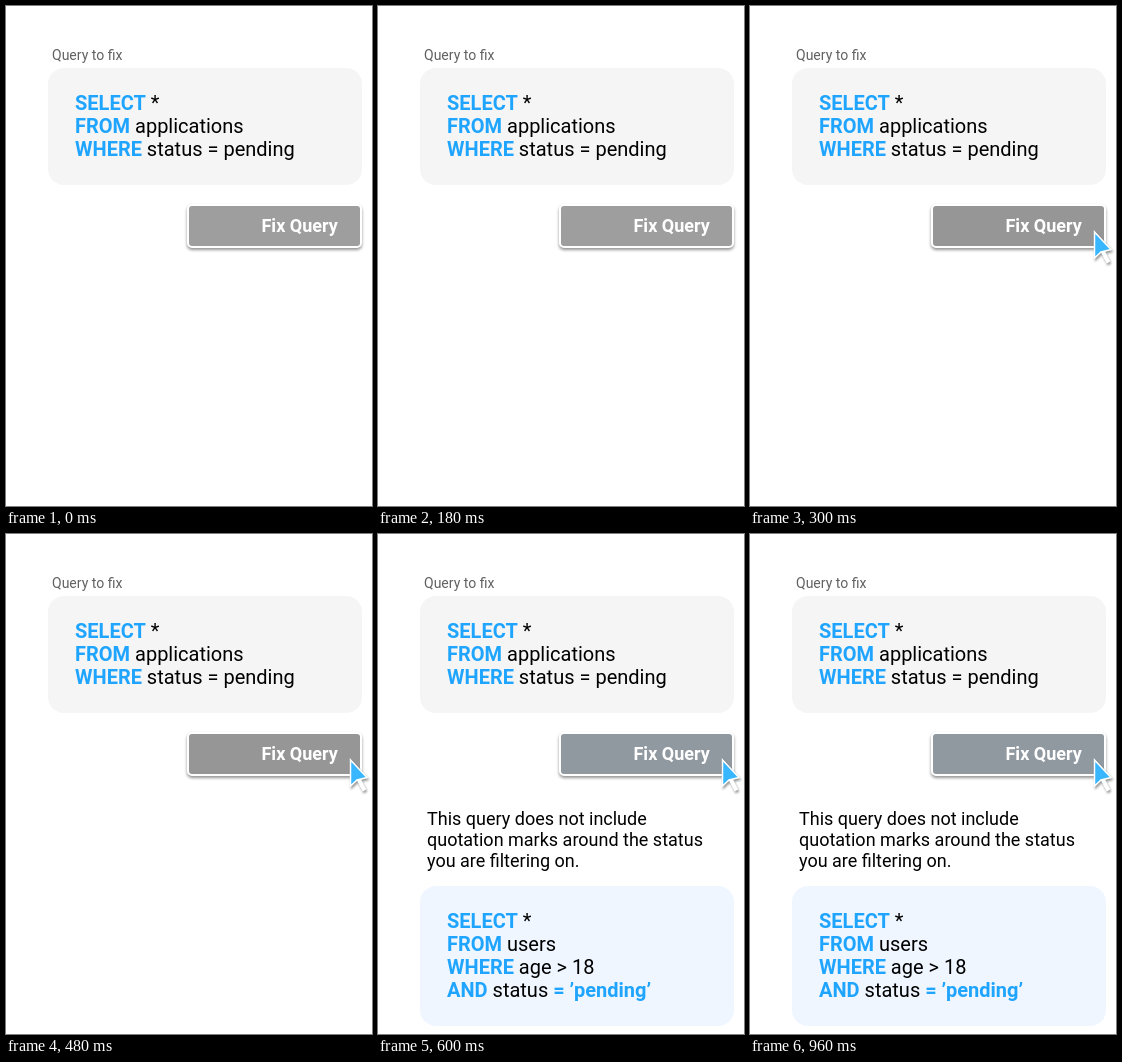
These frames come from a looping animation (366x500 px, 1.2 s). An HTML page:

```html
<!DOCTYPE html>
<html lang="en">
<head>
<meta charset="utf-8">
<title>Fix Query</title>
<style>
  html, body { margin: 0; width: 100%; height: 100%; overflow: hidden; background: #fff; }
  svg { display: block; font: 20px Roboto, sans-serif; }
  .key { font-weight: 700; fill: #1fa5ff; }
  .label { font-size: 14px; fill: #616161; }
  .note { font-size: 18px; }
  .action { font-size: 18px; font-weight: 700; fill: #fff; }
  .button { stroke: #fff; stroke-width: 2; filter: drop-shadow(0 2px 1.5px rgba(0, 0, 0, .42)); }
  .cursor { filter: drop-shadow(1px 2px 1px rgba(0, 0, 0, .4)); }
</style>
</head>
<body>
<svg width="366" height="500" viewBox="0 0 366 500">
  <text class="label" x="46" y="54">Query to fix</text>
  <rect x="42" y="62" width="314" height="117" rx="16" fill="#f5f5f5"/>
  <text x="69" y="104"><tspan class="key">SELECT</tspan> *</text>
  <text x="69" y="127"><tspan class="key">FROM</tspan> applications</text>
  <text x="69" y="150"><tspan class="key">WHERE</tspan> status = pending</text>

  <rect id="button" class="button" x="182" y="199" width="173" height="42" rx="4"/>
  <text class="action" x="255.5" y="226">Fix Query</text>

  <g id="answer">
    <g class="note">
      <text x="49" y="291">This query does not include</text>
      <text x="49" y="312">quotation marks around the status</text>
      <text x="49" y="333">you are filtering on.</text>
    </g>
    <rect x="42" y="352" width="314" height="140" rx="16" fill="#eff6ff"/>
    <text x="69" y="394"><tspan class="key">SELECT</tspan> *</text>
    <text x="69" y="417"><tspan class="key">FROM</tspan> users</text>
    <text x="69" y="440"><tspan class="key">WHERE</tspan> age &gt; 18</text>
    <text x="69" y="463"><tspan class="key">AND</tspan> status <tspan class="key">= ’pending’</tspan></text>
  </g>

  <g id="cursor" class="cursor">
    <path d="M352 244L358.500 256.500" stroke="#fff" stroke-width="4"/>
    <path d="M344.500 226V252L351 246L361 243.500Z" fill="#38b6ff" stroke="#fff" stroke-width="1.500"/>
  </g>
</svg>
<script>
  const LOOP = 1200, HOVER = 300, CLICK = 600;
  const [button, cursor, answer] =
    ["button", "cursor", "answer"].map(id => document.getElementById(id));
  const show = (element, visible) =>
    element.setAttribute("visibility", visible ? "visible" : "hidden");

  function draw(now) {
    const time = now % LOOP;
    const hovered = time >= HOVER, clicked = time >= CLICK;
    button.setAttribute("fill", clicked ? "#9098a0" : hovered ? "#969696" : "#9e9e9e");
    show(cursor, hovered);
    show(answer, clicked);
  }

  const start = performance.now();
  function tick() {
    draw(performance.now() - start);
    requestAnimationFrame(tick);
  }
  tick();
</script>
</body>
</html>
```
